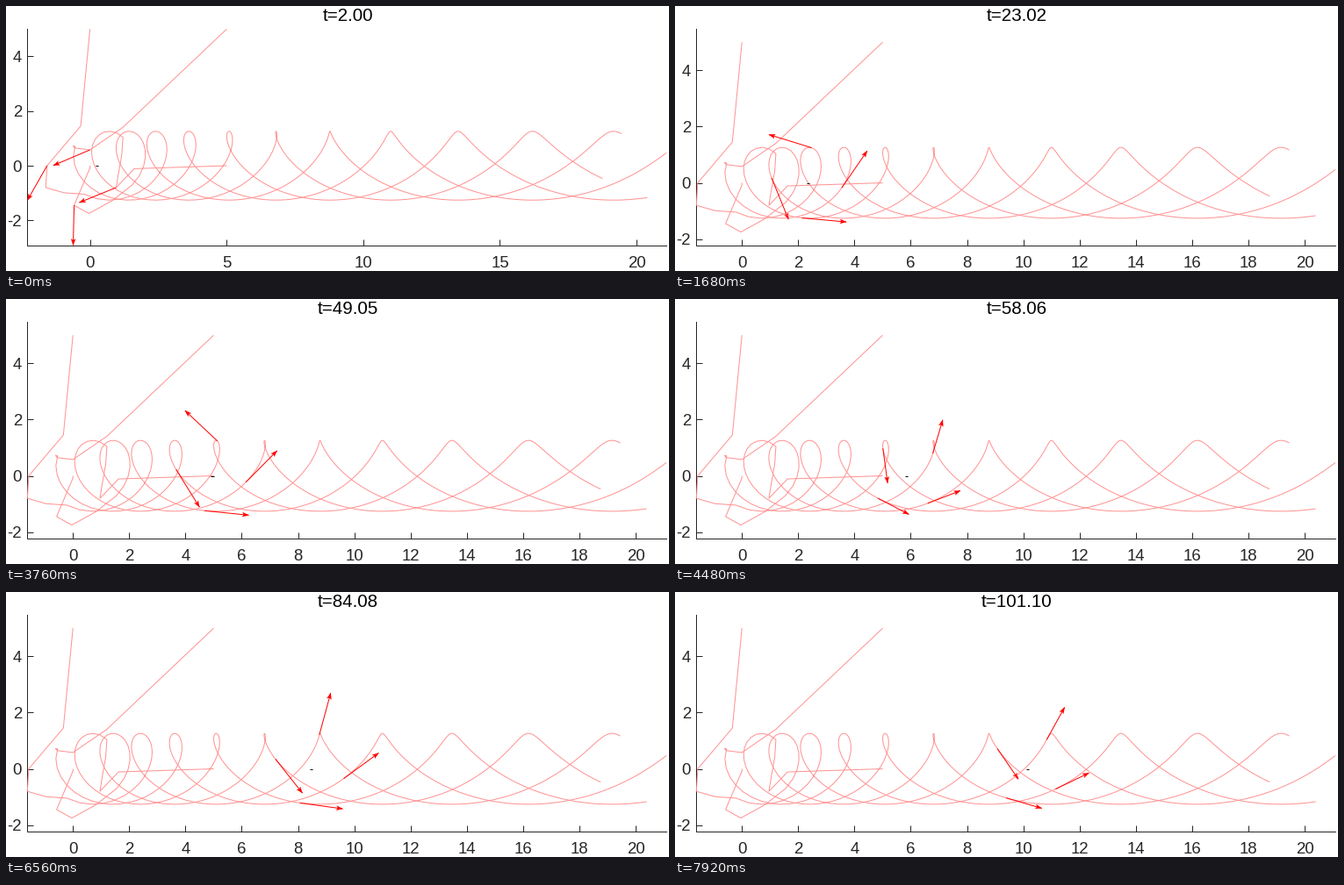
Animation, 755 px wide and 302 px high, one loop 8 s. Source, as a matplotlib script:

```python
import numpy as np
import matplotlib.pyplot as plt
from matplotlib.animation import FuncAnimation
from matplotlib.collections import LineCollection, PolyCollection

W, H, DPI = 755, 302, 100
PX = 72 / DPI
LEFT, RIGHT, TOP, BOTTOM = 24.3, 752, 25.5, 273.4
FRAMES, INTERVAL = 100, 80
SAMPLES, STEP = 200, 1000 / 999
DRIFT, RADIUS, PACE = 0.1, 1.26, 1.25
DARK = "#262626"

plt.rcParams["font.family"] = "Liberation Sans"

# Key points of each agent's approach, one per time step.
APPROACH = np.array([
    [(0, 5), (-.34, 1.45), (-1.57, 0), (-1.62, -.8)],
    [(5, 5), (1.2, 1.4), (0, .58), (-.56, .65)],
    [(5, 0), (1.62, -.11), (.96, -.8), (1.03, -.35)],
    [(0, 0), (0, -.08), (-.58, -1.45), (-.04, -1.75)],
])


def simulate():
    """Positions and heading angles, indexed by sample and agent."""
    t = np.arange(SAMPLES)[:, None] * STEP
    # The formation circles a drifting target, slowing with the root of time.
    angle = np.pi / 2 * (np.sqrt(t / PACE) - 3.38 + np.array([4, 3, 2, 1]))
    speed = RADIUS * np.pi / 4 / np.sqrt(PACE * np.maximum(t, STEP))
    pos = np.stack([DRIFT * t + RADIUS * np.cos(angle),
                    RADIUS * np.sin(angle)], axis=-1)
    # The last approach point's error fades out over two steps.
    known = APPROACH.transpose(1, 0, 2)
    last = len(known) - 1
    error = known[last] - pos[last]
    pos += np.clip(1 - (t - last * STEP) / 2, 0, 1)[..., None] * error
    pos[:last + 1] = known

    vel = np.gradient(pos, axis=0)
    heading = np.where(
        t < 5,
        np.arctan2(vel[..., 1], vel[..., 0]),
        np.arctan2(speed * np.cos(angle), DRIFT - speed * np.sin(angle)))
    return pos, heading


POS, HEADING = simulate()

fig = plt.figure(figsize=(W / DPI, H / DPI), dpi=DPI, facecolor="white")
ax = fig.add_axes([0, 0, 1, 1])
ax.set_xlim(0, W)
ax.set_ylim(H, 0)
ax.axis("off")


def segments(color):
    return ax.add_collection(
        LineCollection([], colors=color, linewidths=PX), autolim=False)


def labels(count, x, y, align):
    return [ax.text(x, y, "", size=18.7 * PX, ha=align, color=DARK)
            for _ in range(count)]


ax.plot([LEFT, LEFT, RIGHT], [TOP, BOTTOM, BOTTOM], color=DARK, lw=PX)
ticks = segments(DARK)
paths = segments("#ff9292")
shafts = segments("red")
target = segments("black")
heads = ax.add_collection(
    PolyCollection([], facecolors="red", edgecolors="red", linewidths=0.3 * PX),
    autolim=False)
title = ax.text(389.4, 17.4, "", size=20.7 * PX, ha="center", color="black")
x_labels = labels(11, 0, 298.5, "center")
y_labels = labels(4, 18, 0, "right")


def arrow_head(tip, angle):
    shape = np.array([(0, 0), (-7, 2.5), (-5.5, 0), (-7, -2.5)])
    c, s = np.cos(angle), np.sin(angle)
    return tip + shape @ np.array([[c, -s], [s, c]])


def update(n):
    k = n + 2
    t = k * STEP
    tails, angles = POS[k], HEADING[k]
    # Arrow length follows the spread of the agents.
    length = 0.9 * np.hypot(*(np.ptp(tails, axis=0) / 2))
    tips = tails + length * np.stack([np.cos(angles), np.sin(angles)], axis=-1)

    # Equal-aspect view that just holds every path and arrow.
    everything = np.vstack([POS.reshape(-1, 2), tips])
    (x_min, y_min), (x_max, y_max) = everything.min(0), everything.max(0)
    scale = (RIGHT - LEFT) / (x_max - x_min)
    y_mid = (y_min + y_max) / 2

    def to_px(points):
        x, y = np.moveaxis(np.asarray(points, float), -1, 0)
        return np.stack([LEFT + (x - x_min) * scale,
                         (TOP + BOTTOM) / 2 - (y - y_mid) * scale], axis=-1)

    tails_px, tips_px = to_px(tails), to_px(tips)
    paths.set_segments(list(to_px(POS).transpose(1, 0, 2)))
    shafts.set_segments(list(np.stack([tails_px, tips_px], axis=1)))
    heads.set_verts([arrow_head(p, a) for p, a in zip(tips_px, angles)])
    target.set_segments([to_px([(DRIFT * t, 0), (DRIFT * (t + 1), 0)])])

    marks = []
    x_step = 5 if x_max - x_min > 23 else 2
    for i, label in enumerate(x_labels):
        value = i * x_step
        x = to_px((value, 0))[0]
        label.set_visible(value < x_max)
        label.set_x(x)
        label.set_text(str(value))
        if value < x_max:
            marks.append([(x, BOTTOM), (x, BOTTOM - 7)])
    for value, label in zip(range(-2, 5, 2), y_labels):
        y = to_px((0, value))[1]
        label.set_y(y + 6.7)
        label.set_text(str(value))
        marks.append([(LEFT, y), (LEFT + 7, y)])
    ticks.set_segments(marks)
    title.set_text(f"t={t:.2f}")
    return []


anim = FuncAnimation(fig, update, frames=FRAMES, interval=INTERVAL,
                     repeat=True, repeat_delay=0, blit=False)
plt.show()
```
